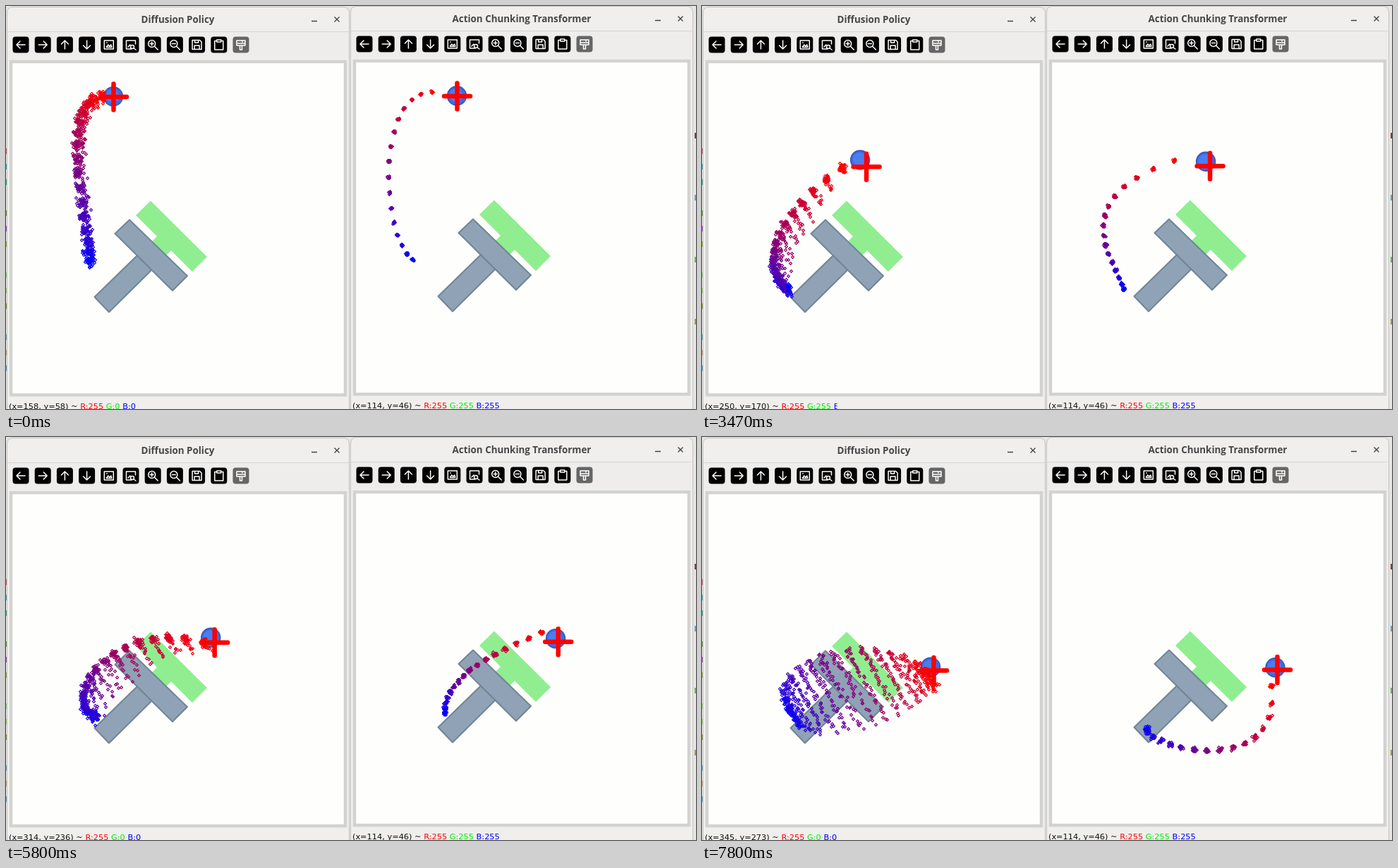
Recreate the animation shown at these times as an HTML page with a canvas. Size 978 by 572 pixels, loop 8000 ms.

```html
<!DOCTYPE html>
<html lang="en">
<head>
<meta charset="utf-8">
<title>Policy rollout</title>
<style>
  html, body { margin: 0; width: 100%; height: 100%; overflow: hidden; background: #e6e6e4; }
  svg, canvas { position: absolute; left: 0; top: 0; display: block; }
  .title { font: bold 13.4px "Open Sans", sans-serif; fill: #474747; text-anchor: middle; }
  .status { font: 11.33px "DejaVu Sans", sans-serif; fill: #111; white-space: pre; }
  .ctrl { stroke: #444; stroke-width: 1.4; fill: none; }
  .glyph { stroke: #fff; stroke-width: 1.5; fill: none; stroke-linecap: round; stroke-linejoin: round; }
  .r { fill: #f00; } .g { fill: #0e0; } .b { fill: #00f; }
</style>
</head>
<body>
<svg width="978" height="572" viewBox="0 0 978 572">
  <defs>
    <clipPath id="cut"><rect x="0" y="555" width="191.5" height="17"/></clipPath>
    <g id="win">
      <path d="M1.5 580V10Q1.5 1.5 10 1.5H478Q486.500 1.500 486.500 10V580Z" fill="#f0efed" stroke="#c4c3c0"/>
      <path d="M2 36.500H486" stroke="#d6d4d1"/>
      <rect x="2" y="37" width="484" height="38" fill="#eeedeb"/>
      <path class="ctrl" d="M433 21.500H441M465.500 15.500L472.500 22.500M472.500 15.500L465.500 22.500"/>
      <g id="tools"></g>
      <rect x="7" y="79" width="474" height="473" fill="#fefefc" stroke="#d2d2d1" stroke-width="4.500"/>
      <path d="M205 276.500L285 356L264 377L234 347L180 401L160 381L214 327L184 297Z" fill="#90ee90"/>
      <g fill="#8fa2b6" stroke="#718594" stroke-width="2" stroke-linejoin="round">
        <path d="M186 354L207 374L146 434.500L125.500 413Z"/>
        <path d="M175 303.500L257 383L236 404L154.500 323Z"/>
      </g>
    </g>
  </defs>
  <g id="behind"></g>
  <use href="#win"/>
  <use href="#win" x="487" y="-1"/>
  <text class="title" x="243.500" y="24">Diffusion Policy</text>
  <text class="title" x="731" y="23">Action Chunking Transformer</text>
  <g clip-path="url(#cut)"><text class="status" id="left" x="4" y="572"></text></g>
  <text class="status" id="right" x="491" y="571"></text>
</svg>
<canvas id="stage" width="978" height="572"></canvas>
<script>
const LOOP = 8000, MOVE_AT = 1470, STEP = 180, LAST = 35, DOTS = 16;
const $ = id => document.getElementById(id);
const ctx = $('stage').getContext('2d');

function random(seed) {
  return () => {
    seed = seed + 0x6D2B79F5 | 0;
    let z = Math.imul(seed ^ seed >>> 15, 1 | seed);
    z = z + Math.imul(z ^ z >>> 7, 61 | z) ^ z;
    return ((z ^ z >>> 14) >>> 0) / 4294967296;
  };
}

// Toolbar icons, drawn around their own centre
const ARROW = 'M6 0H-6M-1 -5L-6 0L-1 5';
const LENS = 'M3.500 -1.500A5 5 0 1 1 -6.500 -1.500A5 5 0 1 1 3.500 -1.500M2.500 2.500L7 7M-4 -1.500H1';
const ICONS = [
  [ARROW], [ARROW, 180], [ARROW, 90], [ARROW, 270],
  ['M-6.500 -6H6.500V6H-6.500ZM-3.500 3.500L-1 0L1 2L3 0L4 3.500ZM-3 -3H-2.500'],
  ['M1 6H-6.500V-6H6.500V-1M-4 3L-1 0M4.500 3A2.500 2.500 0 1 1 -.5 3A2.500 2.500 0 1 1 4.500 3M4 5L7 7'],
  [LENS + 'M-1.500 -4V1'], [LENS],
  ['M-6.500 -6.500H4L6.500 -4V6.500H-6.500ZM-3 -6V-3H2V-6M-3.500 6V1H3.500V6'],
  ['M-3 -5.500H-6V7H6V-5.500H3M-3 -7H3V-4H-3Z'],
  ['M-6 -6H6V1H-6ZM-6 -2H6M-1.500 1V7H1.500V1M2 -6V-4']
];
$('tools').innerHTML = ICONS.map(([d, turn = 0], i) =>
  `<g transform="translate(${21 + 31.2 * i} 55)">
    <rect x="-11.500" y="-11.500" width="23" height="23" rx="4" fill="${i == 10 ? '#666' : '#000'}"/>
    <path class="glyph" d="${d}" transform="rotate(${turn})"/></g>`).join('');

// Slivers of the desktop that show beside the windows
const chance = random(7);
$('behind').innerHTML = Array.from({ length: 16 }, (_, i) =>
  `<rect x="${i % 4 ? 0 : 976}" y="${180 + 22 * i}" width="${i % 4 ? 1 : 2}" height="8"
    fill="hsl(${360 * chance()} 45% ${35 + 30 * chance()}%)"/>`).join('');

// The cross rests, then jumps onto a path with evenly timed points
const REST = [152, 128.5];
const PATH = [179, 178, 209.5, 203.5, 250, 246, 284, 277.5, 308, 308.5, 328, 331];

// Bezier points of both plans at step n; the sampled plan starts gap px left of the cross
const POSES = [
  { n: -1, gap: 17, spread: 10, plan: [71, 132, 114, 306, 119, 362], act: [603, 122, 519, 124, 534, 333, 576, 359] },
  { n: 0, gap: 30, spread: 8, plan: [97, 238, 81, 371, 118, 389], act: [617, 166, 509, 217, 545, 364, 590, 395] },
  { n: 14, gap: 36, spread: 25, plan: [72, 336, 94, 391, 121, 402], act: [683, 234, 505, 290, 600, 369, 599, 403] },
  { n: 19, gap: 16, spread: 24, plan: [84, 278, 102, 399, 125, 396], act: [733, 253, 555, 260, 603, 375, 615, 393] },
  { n: 28, gap: 14, spread: 27, plan: [192, 228, 54, 368, 123, 387], act: [780, 298, 747, 359, 630, 338, 628, 391] },
  { n: LAST, gap: 12, spread: 60, plan: [250, 264, 72, 319, 123, 384], act: [807, 353, 824, 486, 630, 443, 629, 413] }
];

const mix = (a, b, k) => Array.isArray(a) ? a.map((v, i) => mix(v, b[i], k)) : a + (b - a) * k;

function poseAt(n) {
  const i = Math.max(1, POSES.findIndex(p => p.n >= n)), a = POSES[i - 1], b = POSES[i];
  const k = Math.max(0, (n - a.n) / (b.n - a.n));
  return Object.fromEntries(Object.keys(a).map(key => [key, mix(a[key], b[key], k)]));
}

const bezier = (p, u) => [0, 1].map(c =>
  (1 - u) ** 3 * p[c] + 3 * u * (1 - u) ** 2 * p[c + 2] + 3 * u * u * (1 - u) * p[c + 4] + u ** 3 * p[c + 6]);

// Catmull-Rom point at u up to 1 on a flat list of x, y
function along(list, u) {
  const n = list.length / 2, i = Math.max(0, Math.min(n - 2, Math.floor(u * (n - 1)))), f = u * (n - 1) - i;
  return [0, 1].map(c => {
    const at = j => j < 0 ? 2 * at(0) - at(1) : j >= n ? 2 * at(n - 1) - at(n - 2) : list[2 * j + c];
    const [a, b, d, e] = [at(i - 1), at(i), at(i + 1), at(i + 2)];
    return b + f / 2 * (d - a + f * (2 * a - 5 * b + 4 * d - e + f * (3 * (b - d) + e - a)));
  });
}

// Samples gather on the curve; a few stray towards the lower right, most of all mid-way
function cloud(curve, count, spread, noise, seed) {
  const rnd = random(seed), skew = 8 - spread * .108;
  const gauss = () => (rnd() + rnd() + rnd() + rnd() - 2) * 1.73 * noise;
  ctx.lineWidth = 1.1;
  for (let i = DOTS - 1; i >= 0; i--) {
    const u = i / (DOTS - 1), [cx, cy] = bezier(curve, u);
    const reach = spread * (.5 + 1.5 * Math.sin(Math.PI * u));
    ctx.strokeStyle = `rgb(${255 * (1 - u)},0,${255 * u})`;
    ctx.beginPath();
    for (let k = 0; k < count; k++) {
      const stray = reach * ((k + .5) / count) ** skew;
      const x = Math.round(cx + .5 * stray + gauss()) + .5;
      const y = Math.round(cy + .87 * stray + gauss()) + .5;
      ctx.moveTo(x, y - 2);
      ctx.lineTo(x + 2, y);
      ctx.lineTo(x, y + 2);
      ctx.lineTo(x - 2, y);
      ctx.closePath();
    }
    ctx.stroke();
  }
}

function disc(x, y, r, color) {
  ctx.fillStyle = color;
  ctx.beginPath();
  ctx.arc(x, y, r, 0, 7);
  ctx.fill();
}

function ball(x, y) {
  disc(x, y, 14.2, '#3459b8');
  disc(x, y, 12.6, '#4169e1');
  disc(x - 1, y - 1, 9.5, '#4a7df2');
}

function cross(x, y) {
  ctx.strokeStyle = '#f00';
  ctx.lineWidth = 6.5;
  ctx.lineCap = 'round';
  ctx.beginPath();
  ctx.moveTo(x - 18.5, y);
  ctx.lineTo(x + 18.5, y);
  ctx.moveTo(x, y - 18.5);
  ctx.lineTo(x, y + 18.5);
  ctx.stroke();
  ctx.lineCap = 'butt';
}

const status = (x, y, gb) => `(x=${Math.round(x)}, y=${Math.round(y)}) ~ ` +
  `<tspan class="r">R:255</tspan> <tspan class="g">G:${gb}</tspan> <tspan class="b">B:${gb}</tspan>`;

function draw(n) {
  // The balls trail the cross, the mouse runs ahead of it
  const spot = lead => n < 0 ? REST : along(PATH, Math.min(1, (n + lead) / LAST));
  const [x, y] = spot(0), [lx, ly] = spot(-1.4), [rx, ry] = spot(-.9), [mx, my] = spot(1);
  const p = poseAt(n);
  ctx.clearRect(0, 0, 978, 572);
  ball(lx, ly);
  ball(rx + 487, ry - 1);
  cloud([x - p.gap, y, ...p.plan], 46, p.spread, n < 0 ? 3.4 : 2.3, n + 20);
  cloud(p.act, 18, 0, .8 + Math.max(0, n) * .025, n + 99);
  cross(x + .5, y + .5);
  cross(x + 487.5, y - .5);
  $('left').innerHTML = status(1.062 * mx - 3.5, 1.062 * my - 78.5, n > 1 && n < 18 ? 255 : 0);
}

$('right').innerHTML = status(114, 46, 255);
let shown;
const start = performance.now();
function tick() {
  const t = (performance.now() - start) % LOOP;
  const n = Math.min(LAST, Math.floor((t - MOVE_AT) / STEP));
  // The samples settle a little before the move
  const step = n < 0 ? Math.min(n, -4) : n;
  if (step !== shown) draw(shown = step);
  requestAnimationFrame(tick);
}
tick();
</script>
</body>
</html>
```
